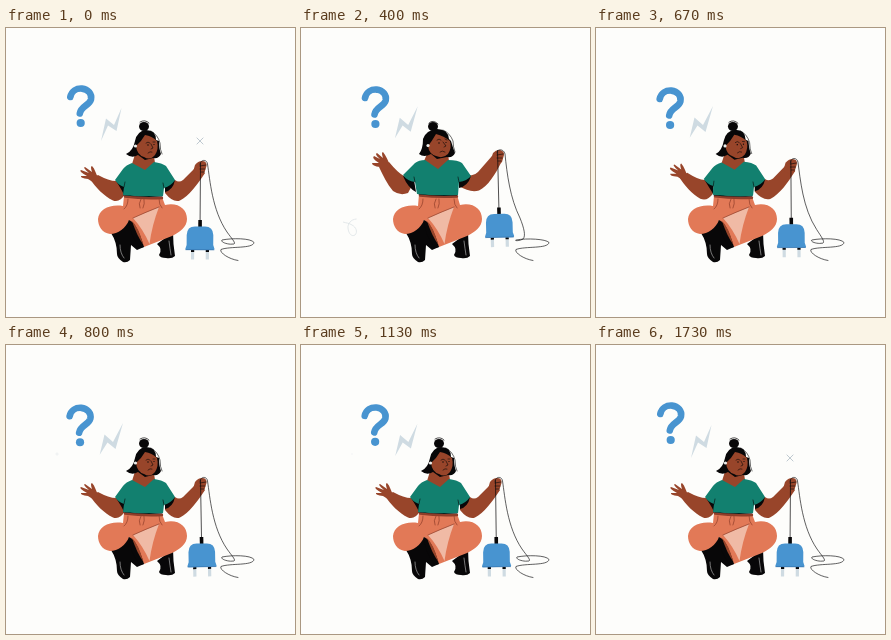
Write an HTML page that moves like this. It is 289 by 289 pixels and loops after 1.76 s.

```html
<!DOCTYPE html>
<html lang="en">
<meta charset="utf-8">
<title>Shrug with a plug</title>
<style>
html, body { margin: 0; width: 100%; height: 100%; overflow: hidden; background: #fdfdfb }
svg { display: block; width: 100vw; height: 100vh }
</style>
<svg id="stage" viewBox="0 0 289 289" stroke-linecap="round" stroke-linejoin="round"></svg>
<script>
const LOOP = 1760;
const skin = '#98452a', ink = '#080708', green = '#12806f', coral = '#e27957',
  blue = '#4894d0', pale = '#cfdbe2', shade = '#8f3d29';
const stage = document.getElementById('stage');

const clamp = x => Math.max(0, Math.min(1, x));
const ramp = (t, a, b) => clamp((t - a) / (b - a));
const smooth = x => x * x * (3 - 2 * x);
const lerp = (a, b, k) => a + (b - a) * k;

// Eased value through [time, value] pairs
function keys(t, list) {
  const i = Math.max(1, list.findIndex(k => k[0] >= t));
  const [a, b] = [list[i - 1], list[i]];
  return lerp(a[1], b[1], smooth(ramp(t, a[0], b[0])));
}

// Blend two paths that share the same commands
function blend(a, b, k) {
  const to = b.match(/-?[\d.]+/g);
  let i = 0;
  return a.replace(/-?[\d.]+/g, n => lerp(+n, +to[i++], k).toFixed(2));
}

const fill = (d, color) => `<path d="${d}" fill="${color}"/>`;
const line = (d, color = ink, width = .8, extra = '') =>
  `<path d="${d}" fill="none" stroke="${color}" stroke-width="${width}" ${extra}/>`;
const dot = (x, y, r, color) => `<circle cx="${x}" cy="${y}" r="${r}" fill="${color}"/>`;
const group = (transform, body) => `<g transform="${transform}">${body}</g>`;

function question(t) {
  const y = 1.15 * (1 - Math.cos(t / LOOP * 2 * Math.PI));
  return group(`translate(${-.3 * y} ${y})`,
    line('M64.3 69C65.5 63 70.5 60.2 76 60.6C82 61.2 86.2 66 85 71.5C83.5 77.5 75 78 73.8 85.5', blue, 6.6) +
    dot(74.7, 95, 4.1, blue));
}

function bolt(t) {
  const k = keys(t, [[0, 0], [200, .7], [670, 1], [930, 1], [1370, .1], [LOOP, 0]]);
  return fill(blend('M95 113L100 90.5L108 97L115.5 80L110.5 103L102 97.5Z',
    'M93.7 109.7L98.5 89.5L107 97L117 78L109.5 104L101.5 97.5Z', k), pale);
}

function sparkle(x, y, size, angle, color) {
  return size < .1 ? '' : group(`translate(${x} ${y}) rotate(${angle}) scale(${size})`,
    line('M-4.3 0H4.3M0-4.3V4.3', color, .8 / Math.max(size, .7)));
}

function accents(t) {
  const right = keys(t, [[0, 1], [150, 0], [1270, 0], [1550, 1], [LOOP, 1]]);
  const turn = t < 200 ? 45 : 45 * smooth(ramp(t, 1370, 1700));
  const left = keys(t, [[0, 0], [740, 0], [900, 1], [980, 1], [1180, 0], [LOOP, 0]]);
  const head = 100 * ramp(t, 30, 300), tail = 100 * ramp(t, 310, 640);
  const curl = head > tail
    ? line('M66 203C66 195 62 191 56 191C50 191 46.5 196 47 200C47.5 206 51 209 54 207C57 204 55 199 51 197C48 195 45 195 42 194',
      '#d9e0e3', .7, `pathLength="100" stroke-dasharray="0 ${tail} ${head - tail} 200" stroke-linecap="butt"`)
    : '';
  return sparkle(194, 113, right, turn, '#b4c0c8') +
    sparkle(51, 109, left, 20 * ramp(t, 930, 1180), '#dbe2e6') + curl;
}

function legs(m) {
  return fill('M105 205L124 192L138 219L131 222L125 217L124 232Q121 235 117 234Q111 230 111 226Q111 214 105 205Z', ink) +
    fill('M151 216L167 204Q167 216 169 228Q166 231 160 230Q154 230 153 227Q157 221 151 216Z', ink) +
    fill(m('M118 168L156 169L159 177C172 174 181 181 181 191C181 199 174 204 166 208L138 219C134 214 128 204 123 192C120 200 112 206 104 206C96 205 92 198 92 191C93 181 104 176 117 178Z',
      'M118 166L156 167L159 177C172 174 181 181 181 191C181 199 174 204 166 208L138 219C134 214 128 204 123 192C120 200 112 206 104 206C96 205 92 198 92 191C93 181 104 176 117 178Z'), coral) +
    fill('M153 179Q141 184 127 190Q137 201 143.5 216Q146 197 153 179Z', '#f0baa5') +
    fill('M122.5 192Q130 193 138 219L134 220Q124 207 122.5 192Z', ink) +
    fill('M126 193Q132 198 137.5 217Q131 208 126 193Z', skin) +
    line('M135 171Q132 176 134 180M138 171Q139 176 137 180M122 171Q122 178 118 181M153 171Q153 177 156 180M127 190Q140 184 153 179', shade, .7) +
    line('M114 217Q114 225 118 230M163 213Q164 221 165 227', '#e8e8e8', .5);
}

function torso(m) {
  return fill(m('M119 153L110 153Q103 153 92 147L84 151C90 160 98 168 107 172.5Q114 175 119 166Z',
      'M114 152L103 148Q97 145 88 134L78 139C82 147 86 156 92 163Q99 168 107 165L115 160Z'), skin) +
    fill(m('M93 152C90 146 89 141 86 138Q84 138 86 144L79 139Q76 139 83 145L75 142Q72 143 81 148L75 148Q74 150 82 151Q86 154 90 155Z',
      'M89 138C87 132 85 128 82 124Q80 124 82 130L76 125Q73 126 79 131L73 128Q70 130 78 135L71 135Q71 138 79 139Q82 141 86 142Z'), skin) +
    fill(m('M159 155L169 152Q173 155 177 152L189 140L199 145C191 157 183 168 174 172.5Q167 175 159 165Z',
      'M158 148L169 147Q173 148 177 144L191 128L201 133C194 147 187 158 178 162.5Q169 165 158 158Z'), skin) +
    fill(m('M110 153L118 157L118 167Q116 162 110 153ZM159 158L169 152Q167 162 159 164Z',
      'M102 148L113 152L115 164Q107 160 102 148ZM158 153L170 148Q167 158 158 160Z'), ink) +
    fill(m('M131 120L147 122L149 135L139 144L126 136Z', 'M129 119L146 120L148 133L137 143L123 133Z'), skin) +
    line(m('M119 168.5Q137 171 156 170', 'M119 167.5Q137 169.5 156 168.5'), shade, 2.4) +
    line(m('M118 167Q137 169 156 168', 'M118 166Q137 168 156 167'), ink, 1.2) +
    fill(m('M126 135Q120 137 117 141L109 152Q112 157 118 159L117 167Q137 169 157 168L158 160Q165 158 169 152L160 138Q156 135 148 134L139 142Z',
      'M124 132Q118 132 114 135L102 147Q106 153 114 154L116 166Q136 168 157 167L158 154Q166 153 170 148L161 135Q157 132 147 132L137 141Z'), green) +
    line(m('M118 159L119 154M158 160L157 155', 'M114 154L113 149M158 154L157 149'), ink, .6);
}

function head(m) {
  const hair = m('M150 112Q150 102 140 102Q131 103 129 113Q127 123 120 126Q126 131 132 127L139 132L147 130Q153 131 155 126Q153 121 153 113Z',
    'M148 111Q147 101 136 101Q125 102 122 111Q122 121 118 126Q123 130 130 126L136 131L146 129Q152 130 154 125Q152 120 150 113Z');
  const face = m('M139 107Q146 108 151 113Q153 121 149 127Q144 133 138 129Q131 127 130 118Q135 114 139 107Z',
    'M135 106Q143 108 149 113Q151 120 147 126Q142 131 135 128Q128 126 127 118Q131 113 135 106Z');
  return fill(hair, ink) +
    `<ellipse cx="${m('138', '132')}" cy="98.5" rx="5" ry="4.6" fill="${ink}"/>` +
    line(m('M134 94Q139 91 143 95', 'M128 95Q132 91 137 96'), ink, .7) +
    fill(face, skin) +
    line(m('M145 103Q152 107 154 115Q154 122 156 126', 'M142 102Q149 105 152 113Q152 119 154 124'), ink, .6) +
    line(m('M140 115Q142 113 144 115M147 114L149 114M145 116L147 120L145 121M142 125Q144 123 146 124',
      'M136 112Q138 110 140 112M144 111L146 112M142 114L145 118L143 119M139 124Q141 122 144 124'), ink, .6) +
    dot(m('142', '138'), m('117', '115'), .7, ink) +
    dot(m('148', '145'), m('116.5', '114.5'), .6, ink) +
    dot(m('129.5', '127'), m('118', '117.5'), 1.6, '#eef0ee');
}

function plug(t, p) {
  const angle = keys(t, [[0, .4], [200, .8], [400, -1.4], [670, -.4], [930, -1.6], [1370, .4], [LOOP, .4]]);
  return group(`translate(${lerp(194.5, 196.5, p)} ${lerp(135, 122.5, p)}) rotate(${angle})`,
    line('M0 0V58', ink, .7) +
    line('M-7.3 87V96.5M7.5 87V96.5', pale, 3.2, 'stroke-linecap="butt"') +
    line('M-7.3 87V89M7.5 87V89', ink, 3.2, 'stroke-linecap="butt"') +
    fill('M-1.8 57H1.8V64H-1.8Z', ink) +
    fill('M-13.3 82V72Q-13 63.5 -5 63.5H5Q13 63.5 13.3 72V82L14.6 86Q14.6 87 13 87H-13Q-14.6 87 -14.6 86Z', blue) +
    line('M-14 86.8H14', '#2f6ba5', .6));
}

function hand(m) {
  return fill(m('M187 144L189 137Q192 133 196 133Q201 133 200.5 138L198 146Q193 150 187 144Z',
      'M190 131L192 125Q195 121.5 199 122Q203.5 123 203 127L201 134Q196 139 190 131Z'), skin) +
    line(m('M194 138L200 137M194 141L199 141M195 144L198 144', 'M196 127L202 126M196 130L201 130M197 133L200 133'), ink, .6);
}

const cord = m => line(m(
  'M194 137C194 131 201 131 201.5 136C204 152 206 182 221 204C226 211 230 215 228 216C222 217 214 214 216 212C226 210 245 210 248 214.5C247 221 224 218 215 221.5C213 224 222 231 232 232.5',
  'M196 125C196 120 203 121 204 126C206 146 209 170 219 190C223 200 225 208 222 211C219 213 213 213 215 212C226 210 245 211 248 214.5C247 221 224 218 215 221.5C213 224 222 231 232 232.5'), '#1c1c1e', .7);

function draw(now) {
  const t = now % LOOP;
  const p = keys(t, [[0, 0], [200, .95], [300, 1], [430, 1], [760, 0], [LOOP, 0]]);
  const m = (a, b) => blend(a, b, p);
  stage.innerHTML = question(t) + bolt(t) + accents(t) + legs(m) + torso(m) + head(m) +
    hand(m) + plug(t, p) + cord(m);
  requestAnimationFrame(draw);
}
draw(performance.now());
</script>
</html>
```
